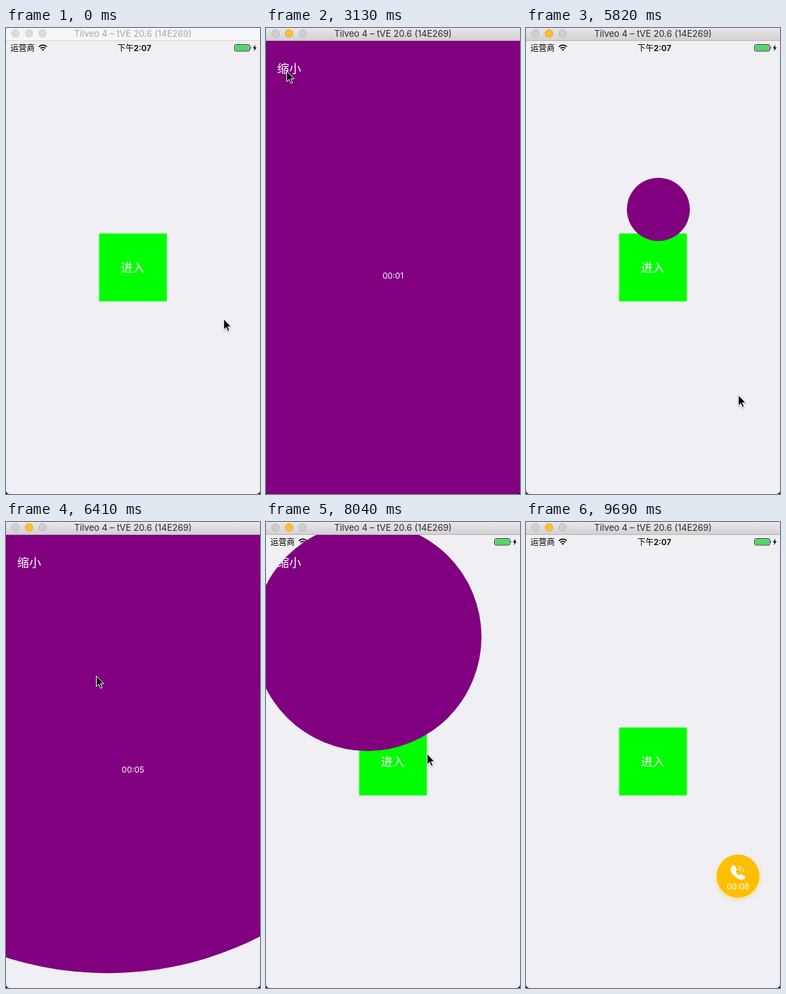
An HTML page that plays this animation: 375x686 px, repeating every 9.79 s.

```html
<!DOCTYPE html>
<html lang="zh-CN">
<head>
<meta charset="utf-8">
<title>Circle transition</title>
<style>
  html, body { margin: 0; width: 100%; height: 100%; overflow: hidden; background: #000; }
  svg { display: block; width: 375px; height: 686px; }
  text { font-family: Inter, "Noto Sans CJK SC", "Noto Sans CJK", sans-serif; text-anchor: middle; }
  .cjk { font-family: "Noto Sans CJK SC", "Noto Sans CJK", sans-serif; font-size: 17.6px; font-weight: 300; fill: #fff; }
  .status { font-size: 12px; }
  .clock { font-size: 12px; fill: #fff; }
  .bar { fill: #f6f6f6; }
  .edge { fill: #dadada; }
  .title { font-size: 13px; fill: #a9a9a9; }
  .light { fill: #dcdcdc; stroke: #d0d0d0; }
  .active .bar { fill: url(#metal); }
  .active .edge { fill: #b5b3b5; }
  .active .title { fill: #2b2b2b; }
  .active .light { fill: #d0ced0; stroke: #bab8ba; }
  .active .light.min { fill: #ffbf2f; stroke: #e2a52b; }
</style>
</head>
<body>
<svg viewBox="0 0 375 686">
  <defs>
    <linearGradient id="metal" x2="0" y2="1">
      <stop stop-color="#e9e7e9"/><stop offset="1" stop-color="#d1cfd1"/>
    </linearGradient>
    <clipPath id="screen"><path d="M0 19H375V681a5 5 0 0 1-5 5H5a5 5 0 0 1-5-5Z"/></clipPath>
    <clipPath id="mask"><circle id="hole"/></clipPath>
    <filter id="glow" x="-30%" y="-30%" width="160%" height="160%">
      <feDropShadow dx="0" dy="3" stdDeviation="3" flood-color="#ffbf00" flood-opacity=".4"/>
    </filter>
    <filter id="shade" x="-50%" y="-30%" width="200%" height="170%">
      <feDropShadow dx="0" dy="1" stdDeviation="1" flood-color="#000" flood-opacity=".35"/>
    </filter>
  </defs>

  <g id="chrome">
    <rect class="bar" width="375" height="19"/>
    <rect class="edge" y="18" width="375" height="1"/>
    <circle class="light" cx="14" cy="8" r="5.6"/>
    <circle class="light min" cx="34" cy="8" r="5.6"/>
    <circle class="light" cx="54" cy="8" r="5.6"/>
    <text class="title" x="187.5" y="13">Tilveo 4 – tVE 20.6 (14E269)</text>
  </g>

  <g clip-path="url(#screen)">
    <rect y="19" width="375" height="667" fill="#efeff4"/>
    <text class="status" x="24.5" y="33.5">运营商</text>
    <g fill="none" stroke="#000" stroke-width="1.8">
      <path d="M48.6 27.6a8.2 8.2 0 0 1 11.6 0"/>
      <path d="M50.9 30a5 5 0 0 1 7 0"/>
      <path d="M54.4 33.8l-1.9-2a2.8 2.8 0 0 1 3.8 0Z" fill="#000" stroke="none"/>
    </g>
    <text class="status" x="189.5" y="33.5" font-weight="500">下午<tspan font-weight="600">2:07</tspan></text>
    <rect x="337.5" y="24.5" width="22.5" height="9.5" rx="2" fill="none" stroke="#222"/>
    <rect x="338.6" y="25.6" width="20.3" height="7.3" rx="1" fill="#4cd964"/>
    <path d="M361 27.5q1.7 1.7 0 3.6Z"/>
    <path d="M368.4 24.4l-4 5.4h2.4l-1 4.4 4.3-5.7h-2.5Z"/>

    <rect x="137.5" y="302.5" width="100" height="100" fill="#0f0"/>
    <text class="cjk" x="187" y="359.2">进入</text>

    <g id="button">
      <circle cx="313" cy="521.3" r="31.7" fill="#ffbf00" filter="url(#glow)"/>
      <path fill="#fff" d="M304 506q3-2 5 1l2 4q1 2-1.500 3.500q2 4 5 5.500q2-2 4-1l4 2q2 2 0 4q-3 2.500-7 1q-10-4-13-12q-1-5 1.500-8Z"/>
      <path fill="none" stroke="#fff" d="M313 510.500a5 5 0 0 1 4.500 5M313.500 506.500a8.500 8.500 0 0 1 7.500 8.500"/>
      <text class="clock" x="313" y="541">00:00</text>
    </g>

    <g clip-path="url(#mask)">
      <g id="panel">
        <rect y="19" width="375" height="667" fill="#800080"/>
        <text class="cjk" x="34.200" y="65.500">缩小</text>
        <text class="clock" x="187.500" y="369">00:00</text>
      </g>
    </g>
  </g>

  <path id="cursor" filter="url(#shade)" stroke="#fff" stroke-linejoin="round"
        d="M0 0V15.500L3.500 12.200L6.200 18L8.600 17L6.100 11.300H11Z"/>
</svg>
<script>
  const LOOP = 9790, STEP = 149;
  const $ = id => document.getElementById(id);
  const set = (id, attrs) => Object.entries(attrs).forEach(a => $(id).setAttribute(...a));
  const show = (id, on) => $(id).style.display = on ? '' : 'none';
  const clocks = document.querySelectorAll('.clock');

  const clamp = u => Math.min(1, Math.max(0, u));
  const lerp = (a, b, p) => a + (b - a) * p;
  const easeOut = (u, power) => 1 - (1 - clamp(u)) ** power;
  const phase = (t, start) => (1 - Math.cos(Math.PI * clamp((t - start) / 500))) / 2;

  // Pointer moves: start, end, x, y.
  const moves = [
    [330, 900, 181, 348],     // enter
    [1790, 2840, 30, 63],     // shrink
    [3150, 3870, 195, 388],
    [4030, 5220, 313, 540],   // floating button
    [5820, 7250, 37, 59],     // shrink again
    [7740, 8040, 237, 338],
    [8040, 8790, 264, 517],
    [8800, 9080, 268, 633]
  ];

  const pointer = t => moves.reduce(([x, y], [start, end, toX, toY]) => {
    const p = easeOut((t - start) / (end - start), 2);
    return [lerp(x, toX, p), lerp(y, toY, p)];
  }, [321, 428]);

  function draw(t) {
    $('chrome').classList.toggle('active', t >= 1190);

    // spread: 0 is the small circle, 1 the full screen; travel: 1 is at the button.
    const spread = 1 - phase(t, 3138) + phase(t, 6027) - phase(t, 7705);
    const travel = phase(t, 3638) - phase(t, 5488) + phase(t, 8205);
    set('hole', {
      cx: lerp(150, 313, travel),
      cy: lerp(169, 521, travel),
      r: lerp(50, 565, spread) - 12.5 * travel
    });
    show('button', travel === 1);
    show('panel', travel < 1);
    set('panel', { transform: `translate(0 ${667 * (1 - easeOut((t - 1190) / 440, 3))})` });

    const seconds = Math.max(0, Math.floor((t - 1040) / 1065));
    clocks.forEach(c => c.textContent = '00:0' + seconds);

    set('cursor', { transform: `translate(${pointer(t).map(v => v + .5)})` });
    show('cursor', t < 9200);
  }

  // The screen refreshes in even steps.
  const origin = performance.now();
  function frame() {
    const now = (performance.now() - origin) % LOOP;
    draw(Math.floor((now + 8) / STEP) * STEP);
    requestAnimationFrame(frame);
  }
  frame();
</script>
</body>
</html>
```
